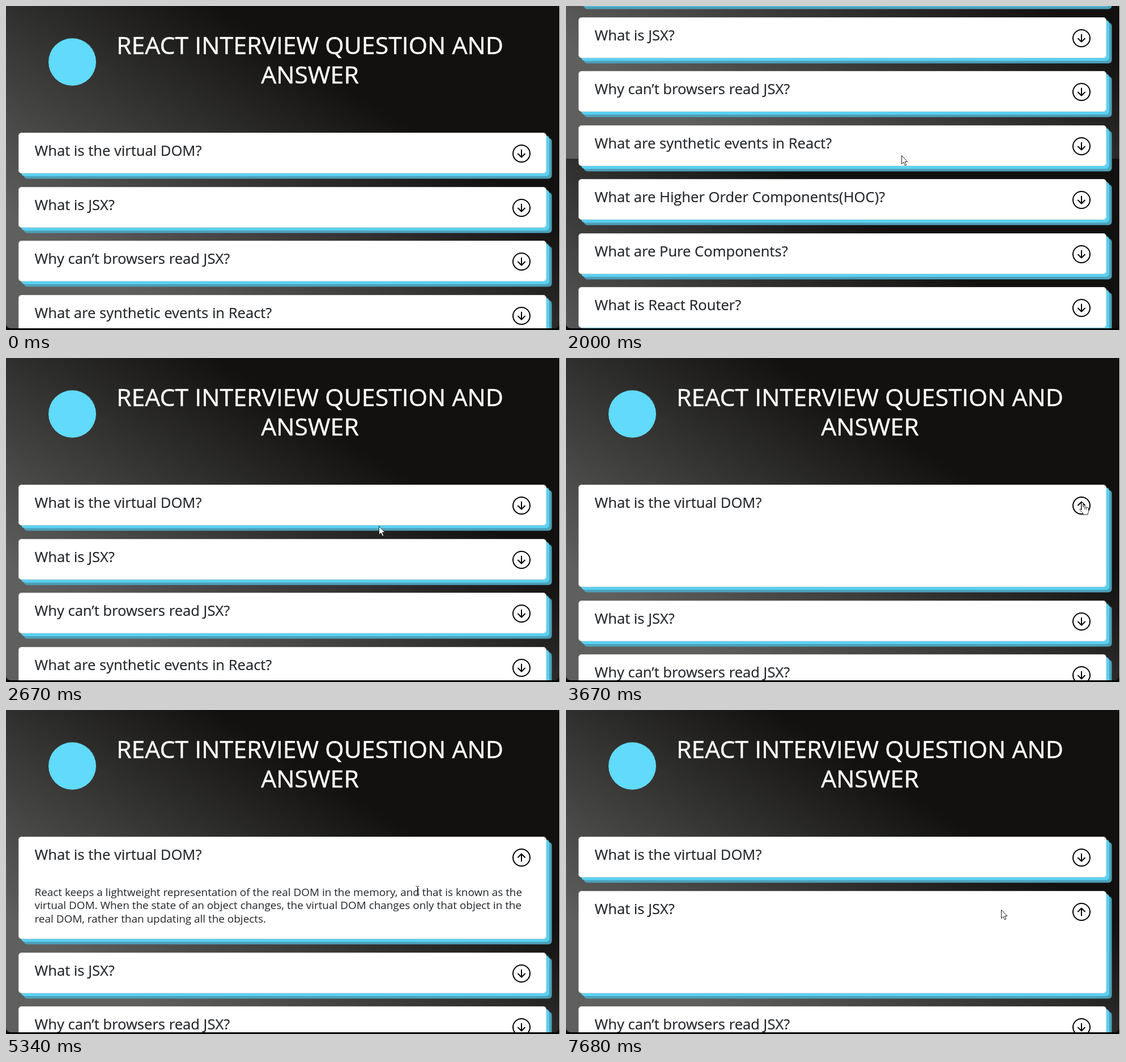
Animation, 978 px wide and 573 px high, one loop 8 s. Source, as an HTML page:

```html
<!DOCTYPE html>
<html lang="en">
<head>
<meta charset="utf-8">
<title>Interview questions</title>
<style>
@property --open { syntax: "<number>"; inherits: true; initial-value: 0; }

html, body { margin: 0; width: 100%; height: 100%; overflow: hidden; background: #000; }
body { font-family: "Open Sans", "Noto Sans", sans-serif; color: #212529; }

.stage { position: relative; width: 977px; height: 573px; overflow: hidden; background: #000; border-right: 1px solid #fff; }
.view { position: absolute; inset: 0 0 3px; overflow: hidden; border-radius: 0 0 8px 8px; }
.page {
  position: relative;
  height: 1140px;
  background: linear-gradient(32deg, #5f605e 17%, #12110f 68%) 0 0 / 978px 570px;
}
.page, .card, .answer, .cursor, .cursor g { animation: 8s step-end infinite; }
.page { animation-name: scroll; }

.logo { position: absolute; left: 75px; top: 57px; width: 84px; height: 84px; border-radius: 50%; background: #61dafb; }
h1 {
  position: absolute; left: 180px; top: 43px; width: 713px; margin: 0;
  font-size: 42.8px; line-height: 52px; font-weight: 400;
  text-align: center; white-space: nowrap; color: #fff;
  -webkit-text-stroke: .5px;
}

.cards { position: absolute; left: 22px; top: 224.3px; width: 932px; }
.card {
  position: relative;
  height: calc(72.2px + var(--open) * 109px);
  margin-bottom: 23.3px;
  border-radius: 6px;
  background: #fff;
  box-shadow: inset 0 0 0 1px #dfdfdf, 5px 5px #5bd0f0, 9.6px 9.6px #4da0b9;
}
.card h2 {
  position: absolute; left: 28.5px; top: 0; margin: 0;
  font-size: 25.6px; line-height: 63px; font-weight: 400; white-space: nowrap;
  -webkit-text-stroke: .2px;
}
.card svg {
  position: absolute; left: 872px; top: 21px; width: 32px; height: 32px;
  rotate: calc(var(--open) * 180deg);
}
.answer {
  position: absolute; left: 28.5px; top: 86.7px; margin: 0;
  font-size: 18.92px; line-height: 23.3px; white-space: nowrap;
  opacity: 0; animation-name: answer;
}
.first { animation-name: first; }
.second { animation-name: second; }

.cursor { position: absolute; left: 0; top: 0; width: 30px; height: 30px; overflow: visible; animation-name: move; }
.cursor g { opacity: 0; fill: #fff; stroke: #222; stroke-linejoin: round; }
.cursor .arrow { animation-name: arrow; }
.cursor .hand { animation-name: hand; }
.cursor .beam { fill: none; animation-name: beam; }

@keyframes scroll {
  0%, 33.375% { transform: none; }
  16.75% { transform: translateY(-14px); }
  20.875% { transform: translateY(-300px); }
  29.25% { transform: translateY(-247px); }
}
@keyframes first { 0%, 79.375% { --open: 0; } 45.875% { --open: 1; } }
@keyframes second { 0% { --open: 0; } 91.875%, 100% { --open: 1; } }
@keyframes answer { 0%, 79.375% { opacity: 0; } 50.125% { opacity: 1; } }

@keyframes move {
  0%, 16.75% { transform: translate(592px, 182px); }
  20.875% { transform: translate(592px, 264px); }
  33.375% { transform: translate(658px, 297px); }
  37.625% { transform: translate(790px, 280px); }
  41.75% { transform: translate(906px, 255px); }
  50.125% { transform: translate(905px, 262px); }
  54.25% { transform: translate(720px, 318px); }
  58.5% { transform: translate(352px, 316px); }
  62.625% { transform: translate(118px, 314px); }
  66.75% { transform: translate(723px, 311px); }
  71% { transform: translate(884px, 252px); }
  75.125% { transform: translate(912px, 255px); }
  87.625% { transform: translate(902px, 381px); }
  91.875% { transform: translate(905px, 350px); }
  96%, 100% { transform: translate(768px, 353px); }
}
@keyframes arrow {
  0%, 41.75%, 54.25%, 75.125%, 91.875% { opacity: 0; }
  16.75%, 50.125%, 71%, 87.625%, 96%, 100% { opacity: 1; }
}
@keyframes hand {
  0%, 50.125%, 87.625%, 96% { opacity: 0; }
  41.75%, 75.125%, 91.875% { opacity: 1; }
}
@keyframes beam { 0%, 71% { opacity: 0; } 54.25% { opacity: 1; } }
</style>
</head>
<body>
<svg width="0" height="0" style="position:absolute">
  <symbol id="down" viewBox="0 0 32 32">
    <g fill="none" stroke="#000" stroke-width="2" stroke-linecap="round" stroke-linejoin="round">
      <circle cx="16" cy="16" r="15"/>
      <path d="M16 9.5V22M10 16.5l6 6 6-6"/>
    </g>
  </symbol>
</svg>
<div class="stage">
  <div class="view">
    <div class="page">
      <div class="logo"></div>
      <h1>REACT INTERVIEW QUESTION AND<br>ANSWER</h1>
      <div class="cards">
        <div class="card first">
          <h2>What is the virtual DOM?</h2><svg><use href="#down"/></svg>
          <p class="answer">React keeps a lightweight representation of the real DOM in the memory, and that is known as the<br>virtual DOM. When the state of an object changes, the virtual DOM changes only that object in the<br>real DOM, rather than updating all the objects.</p>
        </div>
        <div class="card second"><h2>What is JSX?</h2><svg><use href="#down"/></svg></div>
        <div class="card"><h2>Why can’t browsers read JSX?</h2><svg><use href="#down"/></svg></div>
        <div class="card"><h2>What are synthetic events in React?</h2><svg><use href="#down"/></svg></div>
        <div class="card"><h2>What are Higher Order Components(HOC)?</h2><svg><use href="#down"/></svg></div>
        <div class="card"><h2>What are Pure Components?</h2><svg><use href="#down"/></svg></div>
        <div class="card"><h2>What is React Router?</h2><svg><use href="#down"/></svg></div>
      </div>
    </div>
    <svg class="cursor">
      <g class="arrow"><path d="M.5.5v15l3.4-3.2 2.5 5.6 2.4-1-2.5-5.5h4.5z"/></g>
      <g class="hand"><path d="M4 14V2q0-1.5 1.5-1.5T7 2v6q2.5-1 3 .7 2-1 3 .6 2.5-.8 3.5 1.2v6q0 2-1.5 3.5V22H7v-2L1 13.500q-.5-2 1.500-1.500zM10 9v4M13 9.500V13"/></g>
      <g class="beam"><path d="M.5.5q3 0 3 2.500v10q0 2.500-3 2.500M6.500.5q-3 0-3 2.500m0 10q0 2.500 3 2.500"/></g>
    </svg>
  </div>
</div>
</body>
</html>
```
